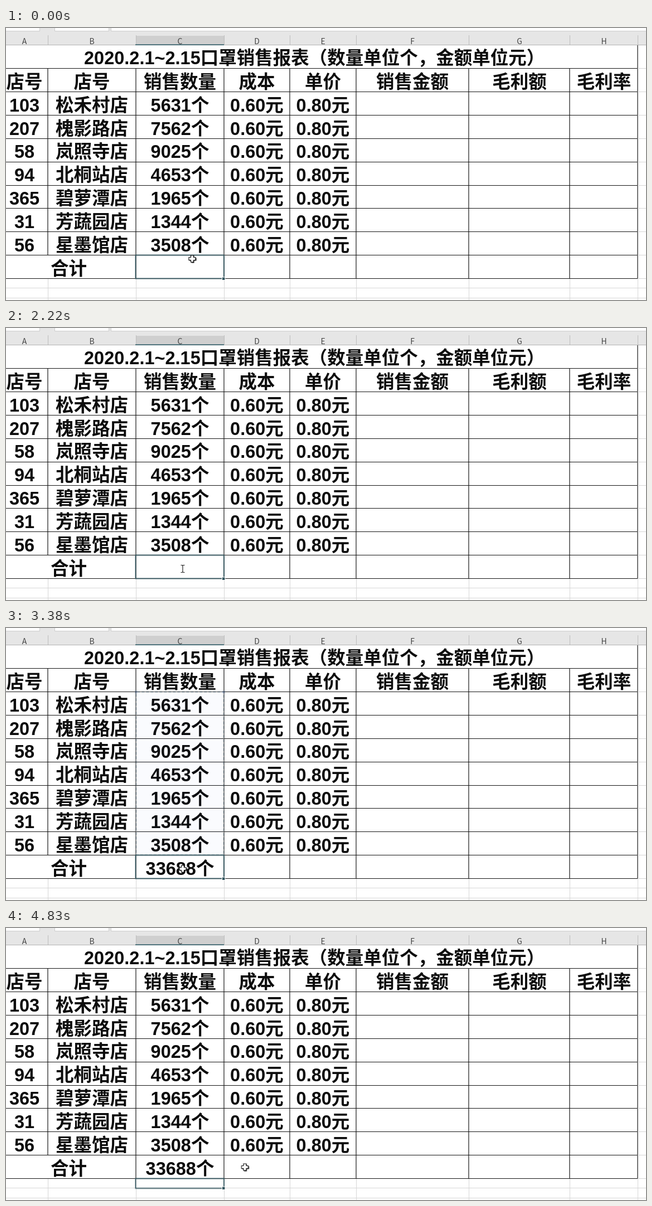
Animation, 1148 px wide and 488 px high, one loop 4.93 s. Source, as an HTML page:

```html
<!DOCTYPE html>
<html lang="zh-CN">
<head>
<meta charset="utf-8">
<title>口罩销售报表</title>
<style>
html, body { margin: 0; width: 100%; height: 100%; overflow: hidden; background: #fff; }
svg { display: block; width: 100%; height: 100%; }
text { white-space: pre; }
.cell { font: 700 32.5px "Liberation Sans", "Noto Sans CJK SC", "Noto Sans CJK", sans-serif; fill: #0c0c0c; }
.head { font: 400 14px "Noto Sans CJK SC", "Noto Sans CJK", sans-serif; fill: #444; }
.formula { font: 300 32px "Noto Sans CJK SC", "Noto Sans CJK", sans-serif; fill: #222; }
.tip { font: 400 11.5px "Noto Sans CJK SC", "Noto Sans CJK", sans-serif; fill: #444; }
.mid { text-anchor: middle; }
.grid { stroke: #d6d6d6; }
.line { stroke: #161616; stroke-width: 1.2; }

/* every animation shares the loop length */
.anim { animation: 4930ms linear infinite; }
#cursor { animation-name: travel; }
#cross { animation-name: cross; animation-timing-function: step-end; }
#beam { animation-name: beam; animation-timing-function: step-end; }
#edit { animation-name: edit; animation-timing-function: step-end; }
#range { animation-name: range; }
#ants { animation-name: march; }
#total { animation-name: total; animation-timing-function: step-end; }
#box { animation-name: box; }
#handle { animation-name: handle; }

@keyframes travel {
  0%, 4.06% { transform: translate(334px, 414px); animation-timing-function: ease-in-out; }
  12.17%, 15.42% { transform: translate(320px, 120px); animation-timing-function: ease-in; }
  18.05% { transform: translate(312px, 382px); animation-timing-function: ease-out; }
  21.3%, 76.67% { transform: translate(317px, 432px); animation-timing-function: ease-in-out; }
  85.8% { transform: translate(409px, 401px); animation-timing-function: ease-in-out; }
  93.3%, 100% { transform: translate(428.5px, 429px); }
}
@keyframes cross { 0% { opacity: 1; } 44.22% { opacity: 0; } 68.15%, 100% { opacity: 1; } }
@keyframes beam { 0% { opacity: 0; } 44.22% { opacity: 1; } 68.15%, 100% { opacity: 0; } }
@keyframes edit { 0% { opacity: 0; } 45.84% { opacity: 1; } 68.15%, 100% { opacity: 0; } }
@keyframes range {
  0%, 45.83% { opacity: 0; }
  45.84%, 68.14% { opacity: 1; }
  68.15% { opacity: .3; }
  69.78%, 100% { opacity: 0; }
}
@keyframes march { to { stroke-dashoffset: -96; } }
@keyframes total { 0% { opacity: 0; } 68.15%, 100% { opacity: 1; } }
@keyframes box {
  0%, 68.97% { transform: translateY(407.5px); height: 42px; animation-timing-function: ease-out; }
  71.4%, 100% { transform: translateY(449.5px); height: 17.5px; }
}
@keyframes handle {
  0%, 68.97% { transform: translateY(447px); animation-timing-function: ease-out; }
  71.4%, 100% { transform: translateY(464px); }
}
</style>
</head>
<body>
<svg viewBox="0 0 1148 488" preserveAspectRatio="none">
  <rect width="1148" height="488" fill="#fff"/>
  <rect width="1148" height="30.5" fill="#e6e6e6"/>
  <g fill="#fff" stroke="#cdcdcd">
    <rect x="-2" y="-3" width="62.5" height="8.5"/>
    <rect x="87.5" y="-3" width="97" height="8.5"/>
    <rect x="188.5" y="-3" width="962" height="8.5"/>
  </g>
  <path d="M0 30.5H1148" stroke="#b4b4b4"/>
  <rect x="233" y="14" width="158" height="16" fill="#cfcfcf"/>
  <g id="lines"></g>
  <path d="M232 30.2H391" stroke="#3c6670" stroke-width="1.8"/>
  <g id="labels"></g>

  <g id="range" class="anim">
    <rect x="233" y="114.5" width="158" height="293" fill="#4a7de0" opacity=".13"/>
    <rect x="233.5" y="114.8" width="157" height="292.2" fill="none" stroke="#fff" stroke-width="2"/>
    <rect id="ants" class="anim" x="233.5" y="114.8" width="157" height="292.2" fill="none" stroke="#2f5f82" stroke-width="2" stroke-dasharray="5 3"/>
    <path d="M231 112.5h5v5h-5zM388 112.5h5v5h-5z" fill="#3d6cb5"/>
  </g>

  <text id="total" class="cell mid anim" x="312" y="442.6">33688个</text>
  <rect id="box" class="anim" x="232.5" y="0" width="158.5" height="42" fill="none" stroke="#34565f" stroke-width="1.8"/>
  <rect id="handle" class="anim" x="387.5" y="0" width="5.5" height="5.5" fill="#34565f" stroke="#fff"/>

  <g id="edit" class="anim">
    <rect x="116" y="409" width="278" height="39" fill="#fff"/>
    <rect x="215" y="408.5" width="86" height="40" fill="#c4c4c4"/>
    <text class="formula" x="117" y="442.5">=SUM(</text>
    <text class="formula" x="215" y="442.5" style="font-size:31px;font-weight:700;fill:#4472c4">C3:C9</text>
    <text class="formula" x="301" y="442.5">)</text>
    <rect x="138.5" y="453.5" width="166" height="18" fill="#000" opacity=".12"/>
    <rect x="137.5" y="452.5" width="165.5" height="17.5" fill="#fff" stroke="#b5b5b5"/>
    <text class="tip" x="142" y="464.5">SUM(<tspan font-weight="700">number1</tspan>, [number2], ...)</text>
  </g>

  <g id="cursor" class="anim">
    <g id="cross" class="anim">
      <path d="M-1.5-5.5h5v4h4v5h-4v4h-5v-4h-4v-5h4z" fill="#111"/>
      <path d="M-2.5-6h5v3.5h3.5v5h-3.5v3.5h-5v-3.5h-3.5v-5h3.5z" fill="#fff" stroke="#111" stroke-width="1.2"/>
    </g>
    <path id="beam" class="anim" d="M-3.5-6.5H-1L0-5.5L1-6.5H3.5M0-5.5V5.5M-3.5 6.5H-1L0 5.5L1 6.5H3.5" fill="none" stroke="#222" stroke-width="1.2"/>
  </g>
</svg>
<script>
const NS = 'http://www.w3.org/2000/svg';
const edges = [75, 233, 391, 509, 628, 830, 1011, 1133];
const centers = [33, 154, 312, 450, 568.5, 729, 921, 1072.5];
const stores = [
  [103, '松禾村店', 5631], [207, '槐影路店', 7562], [58, '岚照寺店', 9025],
  [94, '北桐站店', 4653], [365, '碧萝潭店', 1965], [31, '芳蔬园店', 1344], [56, '星墨馆店', 3508]
];
const rowTop = i => Math.round(72.3 + 41.85 * i) + .5;

function add(parent, tag, attrs, text) {
  const el = document.createElementNS(NS, tag);
  for (const k in attrs) el.setAttribute(k, attrs[k]);
  if (text !== undefined) el.textContent = text;
  document.getElementById(parent).append(el);
}
const line = (cls, x1, y1, x2, y2) => add('lines', 'path', { class: cls, d: `M${x1} ${y1}L${x2} ${y2}` });
const label = (cls, x, y, text) => add('labels', 'text', { class: cls, x, y }, text);
const row = (i, values) => values.forEach((v, c) => label('cell mid', centers[c], 107.8 + 41.85 * i, v));

edges.forEach((x, i) => {
  line('grid', x + .5, 450, x + .5, 488);
  add('lines', 'path', { d: `M${x + .5} 13V30`, stroke: '#bdbdbd' });
  line('line', x, i === 7 ? 31 : 72.5, x, i ? 449.5 : 407.5);
});
for (let i = 0; i < 10; i++) {
  line('grid', 1133, rowTop(i), 1148, rowTop(i));
  line('line', 0, rowTop(i), 1133, rowTop(i));
}
[466.5, 484.5].forEach(y => line('grid', 0, y, 1148, y));

[...'ABCDEFGH'].forEach((c, i) => label('head mid', centers[i], 28.5, c));
label('cell', 140, 65, '2020.2.1~2.15口罩销售报表（数量单位个，金额单位元）');
row(0, ['店号', '店号', '销售数量', '成本', '单价', '销售金额', '毛利额', '毛利率']);
stores.forEach(([id, name, count], i) => row(i + 1, [id, name, count + '个', '0.60元', '0.80元']));
label('cell mid', 112.5, 442.6, '合计');
</script>
</body>
</html>
```
